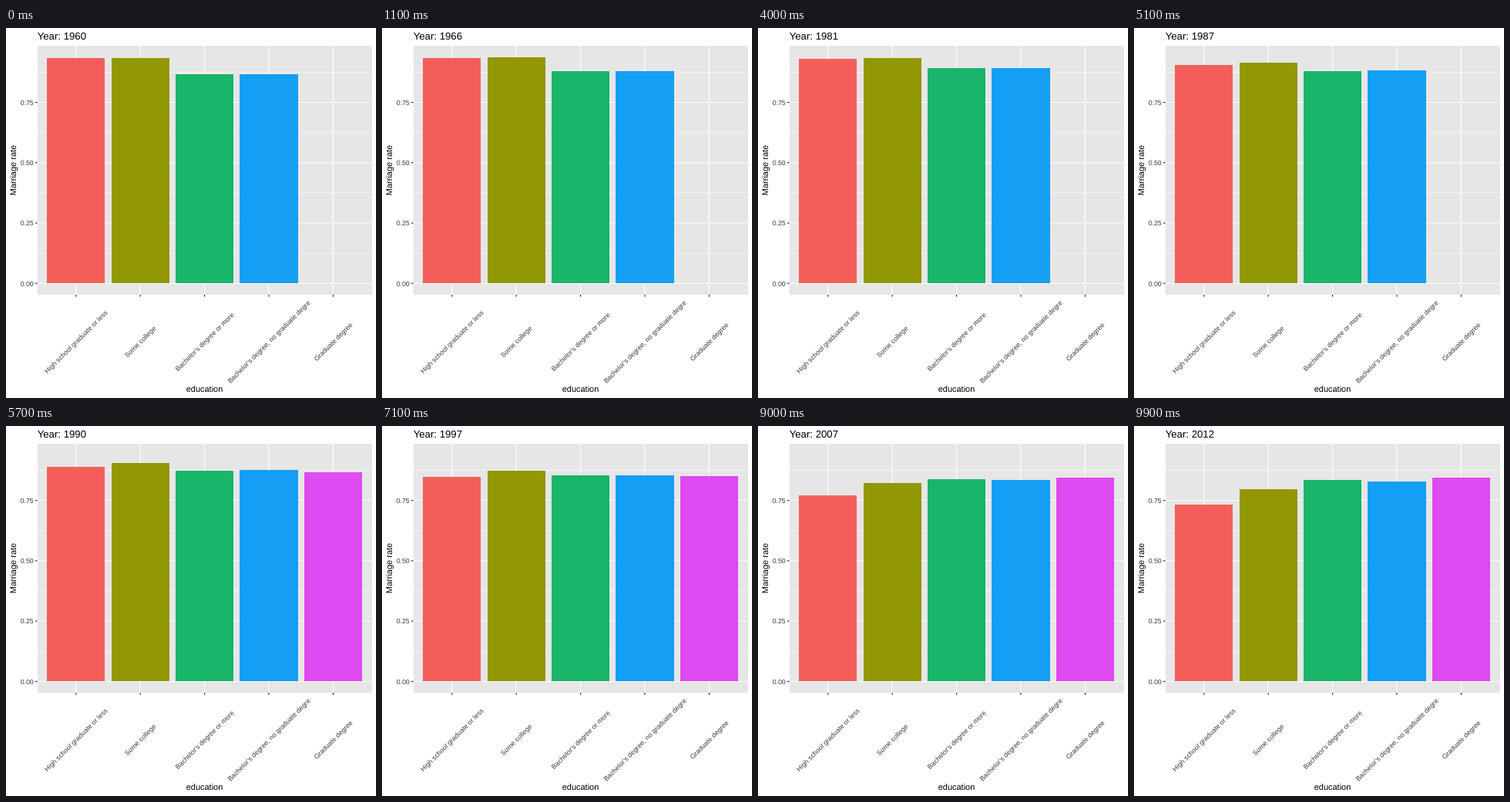
Write an HTML page that moves like this. It is 480 px wide and 480 px high and loops after 10 s.

```html
<!DOCTYPE html>
<html lang="en">
<head>
<meta charset="utf-8">
<title>Marriage rate by education</title>
<style>
  html, body { margin: 0; width: 100%; height: 100%; overflow: hidden; background: #fff; }
  svg { display: block; width: 480px; height: 480px; }
  text {
    font-family: "Liberation Sans", Arial, Helvetica, sans-serif;
    text-rendering: geometricPrecision;
  }
  .label { font-size: 8.8px; fill: #3c3c3c; }
  .axis { font-size: 11px; text-anchor: middle; }
  .title { font-size: 13.2px; }
</style>
</head>
<body>
<svg id="chart" viewBox="0 0 480 480"></svg>
<script>
const STEP = 100, STEPS = 100;
const FIRST_YEAR = 1960, LAST_YEAR = 2012;
const PANEL = { left: 40.7, top: 23, right: 474.5, bottom: 346 };
const ZERO = 331.3, UNIT = 313, BASE = 331;
const TICK = 2.75, TICK_COLOR = "#262626";

// Step and survey reached: one per decade up to 2000, then slow, fast and steady.
const PACE = [[0, 0], [76, 4], [81, 4.065], [88, 4.52], [99, 5]];

// Bar tops in pixels, one per survey from the first one with data.
const BARS = [
  { name: "High school graduate or less", color: "#f35e5a",
    tops: [39.1, 38.45, 38.45, 53.1, 70.4, 102] },
  { name: "Some college", color: "#929705",
    tops: [39.15, 37.7, 37.95, 47.8, 62.25, 82] },
  { name: "Bachelor's degree or more", color: "#18b56a",
    tops: [59.53, 52.87, 51.12, 58, 66.5, 70] },
  { name: "Bachelor's degree, no graduate degre", color: "#139ff3",
    tops: [59.53, 52.87, 51.12, 57.1, 66.4, 72] },
  { name: "Graduate degree", color: "#de4bf0", first: 3,
    tops: [60, 66.8, 67] }
];

const chart = document.getElementById("chart");

function add(tag, attrs, text) {
  const el = document.createElementNS("http://www.w3.org/2000/svg", tag);
  for (const key in attrs) el.setAttribute(key, attrs[key]);
  if (text) el.textContent = text;
  return chart.appendChild(el);
}

function line(x1, y1, x2, y2, stroke, width = 1.07) {
  add("line", { x1, y1, x2, y2, stroke, "stroke-width": width });
}

function block(x1, x2, y, height, fill) {
  return add("rect", { x: x1, width: x2 - x1, y, height, fill, "shape-rendering": "crispEdges" });
}

// Piecewise linear value at x through [x, y] points.
function along(points, x) {
  let i = 1;
  while (i < points.length - 1 && x >= points[i][0]) i++;
  const [x0, y0] = points[i - 1], [x1, y1] = points[i];
  return y0 + (y1 - y0) * (x - x0) / (x1 - x0);
}

const yOf = value => ZERO - value * UNIT;
const unitX = (PANEL.right - PANEL.left) / 5.2;

block(PANEL.left, PANEL.right, PANEL.top, PANEL.bottom - PANEL.top, "#e6e6e6");

for (let value = 0.125; value < 1; value += 0.25) {
  line(PANEL.left, yOf(value), PANEL.right, yOf(value), "#fff", 0.53);
}
for (let value = 0; value < 1; value += 0.25) {
  const y = yOf(value);
  line(PANEL.left, y, PANEL.right, y, "#fff");
  line(PANEL.left - TICK, y, PANEL.left, y, TICK_COLOR);
  add("text", { x: 35.75, y: y + 3.2, class: "label", "text-anchor": "end" }, value.toFixed(2));
}

BARS.forEach((bar, i) => {
  const x = PANEL.left + unitX * (0.6 + i), half = unitX * 0.45;
  line(x, PANEL.top, x, PANEL.bottom, "#fff");
  line(x, PANEL.bottom, x, PANEL.bottom + TICK, TICK_COLOR);
  add("text", {
    class: "label", "text-anchor": "middle", y: 3.15,
    transform: `translate(${x} 407) rotate(-45)`
  }, bar.name);
  bar.el = block(Math.round(x - half), Math.round(x + half), BASE, 0, bar.color);
  bar.points = bar.tops.map((top, n) => [n + (bar.first || 0), top]);
});

add("text", { class: "axis", x: 257.5, y: 472 }, "education");
add("text", { class: "axis", transform: "translate(13.4 184.5) rotate(-90)" }, "Marriage rate");
const title = add("text", { class: "title", x: PANEL.left, y: 15 });

function draw(step) {
  const year = FIRST_YEAR + (LAST_YEAR - FIRST_YEAR) * step / (STEPS - 1);
  title.textContent = "Year: " + Math.round(year);
  const survey = along(PACE, step);
  for (const { el, points } of BARS) {
    const top = survey < points[0][0] ? BASE : Math.round(along(points, survey));
    el.setAttribute("y", top);
    el.setAttribute("height", BASE - top);
  }
}

const start = performance.now();
function tick() {
  draw(Math.floor((performance.now() - start) / STEP) % STEPS);
  requestAnimationFrame(tick);
}
tick();
</script>
</body>
</html>
```
